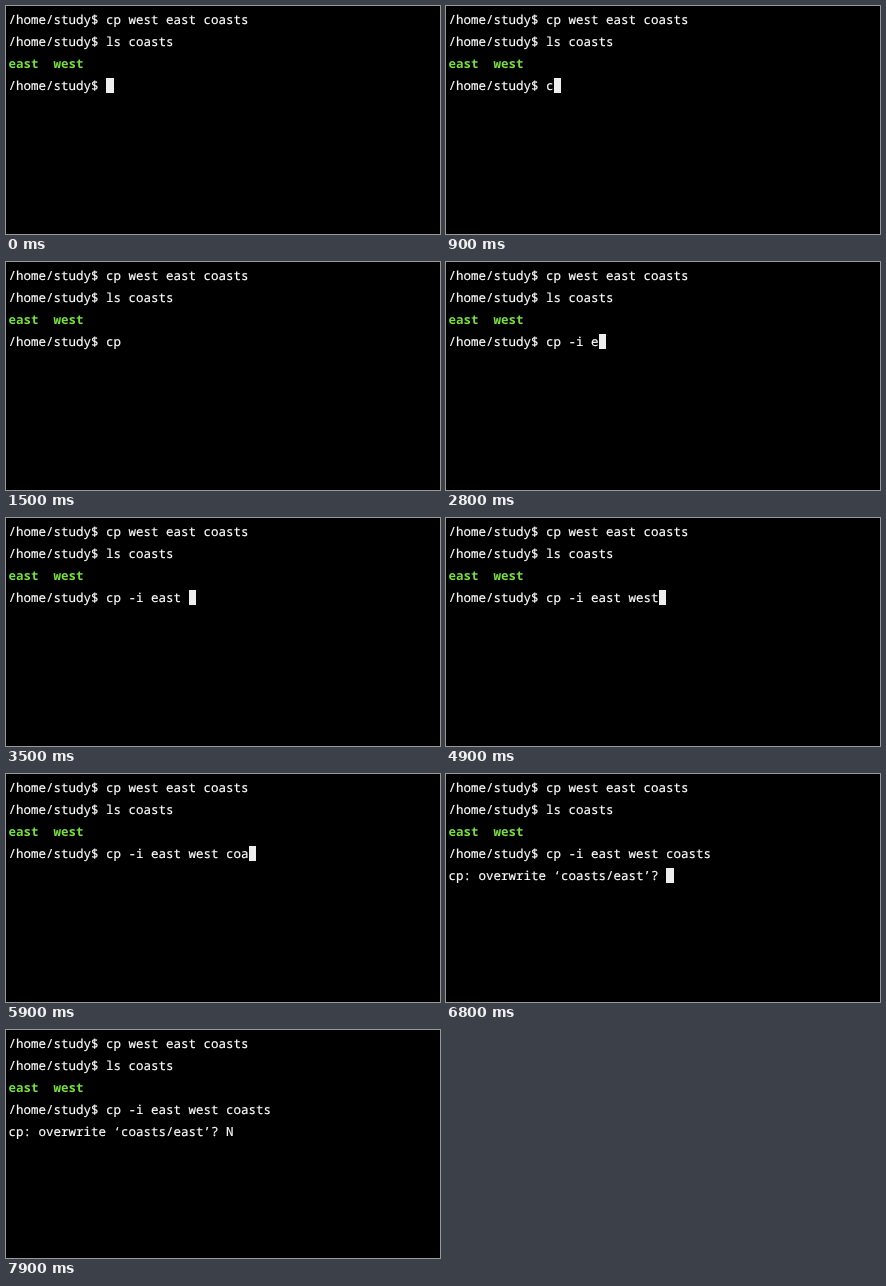
An HTML page for the animation above (8 s loop, 434x228 px).

```html
<!DOCTYPE html>
<html lang="en">
<head>
<meta charset="utf-8">
<title>Terminal</title>
<style>
  html, body { margin: 0; width: 100%; height: 100%; overflow: hidden; background: #000; }
  svg { display: block; width: 434px; height: 228px; }
  text {
    font: 12.5px "Noto Sans Mono", "DejaVu Sans Mono", monospace;
    fill: #fff;
    stroke: #fff;
    stroke-width: 0.2px;
    white-space: pre;
    text-rendering: geometricPrecision;
    font-variant-ligatures: none;
  }
  .exec { font-weight: bold; fill: #78dc46; stroke: none; }
</style>
</head>
<body>
<svg id="stage" viewBox="0 0 434 228" xmlns="http://www.w3.org/2000/svg">
  <rect width="434" height="228" fill="#000"/>
  <rect id="cursor" height="15" fill="#eee"/>
</svg>
<script>
const LOOP = 8000, STEP = 100;
const LEFT = 2.5, CHAR = 7.5, ROW = 22;
const PROMPT = "/home/study$ ";
const QUESTION = "cp: overwrite ‘coasts/east’? ";
const ENTER = 6800, REPLY = 7700;

// Each word is typed at an even pace between its first and last key.
const words = [
  { keys: "cp ", from: 900, to: 1300 },
  { keys: "-i ", from: 1900, to: 2500 },
  { keys: "east ", from: 2800, to: 3500 },
  { keys: "west ", from: 4100, to: 5200 },
  { keys: "coasts", from: 5400, to: 6500 }
];

// Spans in which the cursor is blinked off.
const blinks = [[400, 900], [1500, 2200], [3900, 4100], [7400, REPLY], [7900, LOOP]];

const stage = document.getElementById("stage");
const cursor = document.getElementById("cursor");

function addLine(row, content, cls = "") {
  const el = document.createElementNS(stage.namespaceURI, "text");
  el.setAttribute("x", LEFT);
  el.setAttribute("y", 18 + row * ROW);
  el.setAttribute("class", cls);
  el.textContent = content;
  stage.appendChild(el);
  return el;
}

addLine(0, PROMPT + "cp west east coasts");
addLine(1, PROMPT + "ls coasts");
addLine(2, "east  west", "exec");
const commandLine = addLine(3, PROMPT);
const answerLine = addLine(4, "");

function typed({ keys, from, to }, t) {
  const pace = (to - from) / (keys.length - 1);
  const keyTime = i => Math.round((from + i * pace) / STEP) * STEP;
  return [...keys].filter((key, i) => keyTime(i) <= t).join("");
}

function setText(el, content) {
  if (el.textContent !== content) el.textContent = content;
}

function placeCursor(row, column, visible) {
  const x = Math.round(LEFT + column * CHAR);
  const end = Math.round(LEFT + (column + 1) * CHAR);
  cursor.setAttribute("x", x);
  cursor.setAttribute("y", 6 + row * ROW);
  cursor.setAttribute("width", end - x);
  cursor.setAttribute("visibility", visible ? "visible" : "hidden");
}

function render(t) {
  const asked = t >= ENTER;
  const command = PROMPT + words.map(word => typed(word, t)).join("");
  const answer = (asked ? QUESTION : "") + (t >= REPLY ? "N" : "");
  const hidden = blinks.some(([off, on]) => t >= off && t < on);
  setText(commandLine, command);
  setText(answerLine, answer);
  placeCursor(asked ? 4 : 3, (asked ? answer : command).length, !hidden);
}

const start = performance.now();
function tick() {
  render((performance.now() - start) % LOOP);
  requestAnimationFrame(tick);
}
tick();
</script>
</body>
</html>
```
